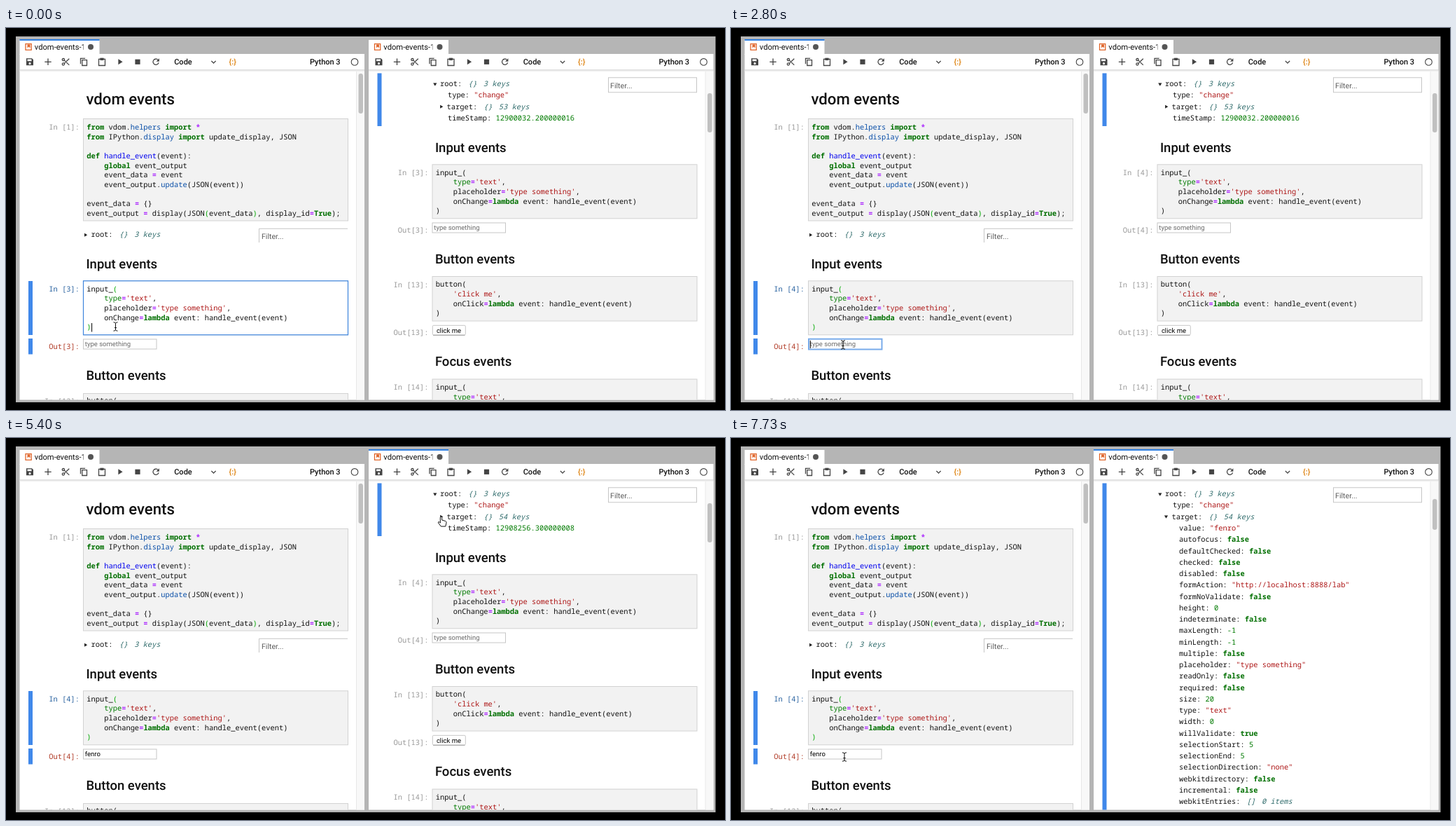
Animation of 1027x545 px, one loop 8000 ms. Source, as an HTML page:

```html
<!DOCTYPE html>
<html lang="en">
<head>
<meta charset="utf-8">
<title>vdom events</title>
<style>
  html, body { margin: 0; width: 100%; height: 100%; overflow: hidden; background: #000; }
  svg { display: block; width: 100%; height: 100%; }
  text { white-space: pre; fill: #111; text-rendering: geometricPrecision; }
  .mono { font: 500 10.42px "Noto Sans Mono", "DejaVu Sans Mono", monospace; }
  .h1 { font: 500 22.2px Roboto, sans-serif; }
  .h2 { font: 500 18.5px Roboto, sans-serif; }
  .ui { font: 500 11px Roboto, sans-serif; }
  .tab { font: 11.2px Roboto, sans-serif; }
  .filter { font: 10.6px Roboto, sans-serif; fill: #5c5c5c; }
  .field { font: 9.5px Roboto, sans-serif; fill: #000; }
  .hint { fill: #6c6c6c; }
  .prompt { text-anchor: end; font-weight: 400; fill: #999; }
  .in { fill: #2a63a0; }
  .out { fill: #b03a26; }
  .kw { fill: #006f00; font-weight: 700; }
  .builtin, .num { fill: #007a00; }
  .str { fill: #ad1616; }
  .op { fill: #a2f; font-weight: 700; }
  .def { fill: #00e; }
  .attr { fill: #0a4fa8; }
  .match { fill: #0a0; }
  .meta { fill: #2f6b6b; font-style: italic; }
  .icon { fill: none; stroke: #444; stroke-width: 1.3; }
  .solid { fill: #444; fill-rule: evenodd; }
  .bar { fill: #4088ea; }
  .cell { fill: #f2f2f2; stroke: #d2d2d2; }
  .box { fill: #fff; stroke: #c6c6c6; }
</style>
</head>
<body>
<svg id="stage" viewBox="0 0 1027 545"></svg>
<script>
const LOOP = 8000, TICKS = 120, LINE = 13.65, ROW = 16.25;
const NAME = 'fenro';

// Markup shown only during the given tick ranges, e.g. "0-4 9-12"
const at = (on, markup) => `<g data-on="${on}">${markup}</g>`;
const text = (x, y, cls, body, extra = '') => `<text x="${x}" y="${y}" class="${cls}" ${extra}>${body}</text>`;
const rect = (x, y, w, h, cls, extra = '') =>
  `<rect x="${x}" y="${y}" width="${w}" height="${h}" class="${cls}" ${extra}/>`;
const path = (d, cls, extra = '') => `<path d="${d}" class="${cls}" ${extra}/>`;
const span = (cls, body, extra = '') => `<tspan class="${cls}" ${extra}>${body}</tspan>`;

// Square brackets in code stand for highlighted matching parentheses
const TOKENS = new RegExp([
  "(?<str>'[^']*')", '(?<kw>\\b(?:from|import|def|global|lambda|True)\\b)', '(?<builtin>\\btype\\b)',
  '(?<def>(?<=def )\\w+)', '(?<attr>(?<=\\.)\\w+)', '(?<op>[=*])', '(?<match>[\\[\\]])'
].join('|'), 'g');
const highlight = line => line.replace(TOKENS, (token, ...rest) => {
  const kind = Object.entries(rest.at(-1)).find(([, value]) => value)[0];
  return span(kind, token.replace('[', '(').replace(']', ')'));
});
const code = (y, lines) => lines.map((line, i) => text(115.2, y + i * LINE, 'mono', highlight(line))).join('');
const prompt = (y, label, cls = '') => text(105, y, 'mono prompt ' + cls, label + ':');
const cell = (y, h) => rect(110.5, y, 378, h, 'cell');
const heading = (y, label) => text(114.4, y, 'h2', label);
const bar = (y, h, id = '') => rect(32, y, 6, h, 'bar', id);
const hint = y => text(112.8, y, 'field hint', 'type something');
const field = y => rect(110.5, y, 104.5, 14, 'box');
const inputLines = (open, close) => [
  'input_' + open, "    type='text',", "    placeholder='type something',",
  '    onChange=lambda event: handle_event(event)', close
];
const buttonLines = ['button(', "    'click me',", '    onClick=lambda event: handle_event(event)', ')'];

const twisty = (x, y, open) => path(open ? `M${x - 2.6} ${y - 1.8}h5.2l-2.6 4.2z` : `M${x - 2} ${y - 2.5}v5l4.2-2.5z`, '', 'fill="#222"');
const branch = (x, y, key, brace, count, id = '') => text(x, y, 'mono',
  key + ':' + span('meta', brace, 'dx="9"') + span('meta', count, 'dx="9" ' + id));
const kindOf = value => value[0] === '"' ? 'str' : /^[\d-]/.test(value) ? 'num' : 'kw';
const leaf = (x, y, key, value, id = '') => text(x, y, 'mono', key + ': ' + span(kindOf(value), value, id));

const ICONS = [
  [34, path('M-5-5H3L5-3V5H-5ZM-3.5-3.8V-1H2.5V-3.8ZM0 .8a1.6 1.6 0 1 0 .01 0Z', 'solid')],
  [60, path('M-4.7 0H4.7M0-4.7V4.7', 'icon')],
  [85.3, path('M-2-2.2L5 4.6M-2 2.2L5-4.6M-5-3.2a1.6 1.6 0 1 0 3.2 0a1.6 1.6 0 1 0-3.2 0M-5 3.2a1.6 1.6 0 1 0 3.2 0a1.6 1.6 0 1 0-3.2 0', 'icon')],
  [111, path('M-4.5 3V-5H2.2M-2.2-2.7H4.5V5.2H-2.2Z', 'icon')],
  [137, path('M-4.5-4H4.5V5.2H-4.5Z', 'icon') + path('M-2.6-5.6H2.6V-2.2H-2.6Z', 'solid')],
  [163, path('M-2.6-4L3.6 0L-2.6 4Z', 'solid')],
  [188, path('M-3.6-3.6H3.6V3.6H-3.6Z', 'solid')],
  [214, path('M3-2.9A4.1 4.1 0 1 0 4.1 1', 'icon') + path('M4.9-5V-.6H.5Z', 'solid')]
];

const panel = (shift, active, mode, hover, content) => `<g transform="translate(${shift})">
  ${rect(19.5, 17, 114, 21, '', 'fill="#fff"')}
  ${at(active, rect(19.5, 16, 114, 2, '', 'fill="#2c7de0"'))}
  ${path('M28 22.7H36.2V31.3H28Z', '', 'fill="none" stroke="#e0662b" stroke-width="1.3"')}
  ${path('M30.5 23.5H34.5V28.5L32.5 26.8L30.5 28.5Z', '', 'fill="#e0662b"')}
  <g clip-path="url(#label)">${text(40.8, 31, 'tab', 'vdom-events-1')}</g>
  <circle cx="121" cy="27" r="4" fill="#555"/>
  ${rect(19.5, 37, 492.5, 493.5, '', 'fill="#fff"')}
  ${hover}
  ${ICONS.map(([x, icon]) => `<g transform="translate(${x} 48.3)">${icon}</g>`).join('')}
  ${mode}
  ${path('M293.4 47L296.5 50.1L299.6 47', 'icon')}
  ${text(323.7, 52, 'ui', '{:}', 'style="fill:#e08a1e;font-weight:700" text-anchor="middle"')}
  ${text(434, 52.4, 'ui', 'Python 3')}
  <circle cx="498" cy="48.4" r="4.8" class="icon" style="stroke-width:1.1"/>
  ${at('2-7 48-49 53-54', '<circle cx="498" cy="48.4" r="4.8" class="solid"/>')}
  ${rect(19.5, 59.5, 492.5, 1, '', 'fill="#c4c4c4"')}${rect(19.5, 60.5, 492.5, 1.5, '', 'fill="#eee"')}
  <g clip-path="url(#page)">${rect(501, 62, 12, 470, '', 'fill="#f8f8f8"')}${path('M500.5 62V531', '', 'stroke="#e8e8e8"')}${content}</g>
</g>`;
const thumb = (y, h) => rect(503.5, y, 6.5, h, '', 'rx="3.2" fill="#c0c0c0"');
const codeMode = text(240.2, 52.4, 'ui', 'Code');

const left = [
  thumb(65, 57),
  text(114.4, 108.6, 'h1', 'vdom events'),
  prompt(145.3, 'In [1]'), cell(129.5, 145.5),
  code(145, [
    'from vdom.helpers import *', 'from IPython.display import update_display, JSON', '',
    'def handle_event(event):', '    global event_output', '    event_data = event',
    '    event_output.update(JSON(event))', '', 'event_data = {}',
    'event_output = display(JSON[event_data], display_id=True);'
  ]),
  twisty(114, 295.3, false), branch(121.4, 298.3, 'root', '{}', '3 keys'),
  path('M361.5 306V286.3H488', 'box'), text(365, 300.6, 'filter', 'Filter...'),
  heading(342.8, 'Input events'),
  at('0-1 27-120', bar(361, 77)),
  at('0-1 27-120', bar(443, 22.5)),
  at('0-1', prompt(376, 'In [3]', 'in')), at('1-4', prompt(376, 'In [*]')),
  at('4-27', prompt(376, 'In [4]')), at('27-120', prompt(376, 'In [4]', 'in')),
  cell(360.8, 77),
  at('0-1', rect(110.5, 360.8, 378, 77, '', 'fill="#fff" stroke="#3c84dc" stroke-width="1.2"') +
    path('M122.6 421V433.5', '', 'stroke="#000"')),
  code(375.7, inputLines('[', ']')),
  at('0-1', prompt(457.6, 'Out[3]', 'out')), at('1-2', prompt(457.6, 'Out[3]')),
  at('3-27', prompt(457.6, 'Out[4]')), at('27-120', prompt(457.6, 'Out[4]', 'out')),
  at('0-2 3-120', field(444)),
  at('27-81', rect(111, 443.7, 104.5, 14.8, '', 'fill="#fff" stroke="#79abea" stroke-width="2"')),
  at('0-2 3-43', hint(454.2)),
  text(112.8, 454.2, 'field', '', 'id="typed"'),
  at('27-35 42-60 68-76', path('M0 445.8V457', '', 'id="caret" stroke="#000"')),
  `<g class="below">${at('1-27', bar(474, 39))}${heading(502, 'Button events')}${prompt(535.6, 'In [13]')}
    ${cell(521.5, 64)}${code(535.3, buttonLines)}</g>`
].join('');

const fields = `value "${NAME}"|autofocus false|defaultChecked false|checked false|disabled false|
formAction "http://localhost:8888/lab"|formNoValidate false|height 0|indeterminate false|maxLength -1|
minLength -1|multiple false|placeholder "type something"|readOnly false|required false|size 20|type "text"|
width 0|willValidate true|selectionStart 5|selectionEnd 5|selectionDirection "none"|webkitdirectory false|
incremental false`.split('|').map(item => item.trim().match(/(\S+) (.*)/).slice(1));

const belowTree = [
  bar(64.5, 75.5), thumb(93, 56), twisty(123.6, 112.3, false),
  leaf(132.4, 132, 'timeStamp', '12900032.200000016', 'id="stamp"'),
  heading(176.8, 'Input events'),
  at('0-1', prompt(210, 'In [3]')), at('1-4', prompt(210, 'In [*]')), at('4-120', prompt(210, 'In [4]')),
  cell(194.8, 77), code(209.7, inputLines('(', ')')),
  at('0-2', prompt(291.6, 'Out[3]')), at('3-120', prompt(291.6, 'Out[4]')),
  at('0-2 3-120', field(278) + hint(288.4)),
  `<g class="below">${heading(336, 'Button events')}${prompt(369.6, 'In [13]')}${cell(354.5, 63.5)}
    ${code(369.4, buttonLines)}${prompt(437.6, 'Out[13]')}
    ${rect(110.8, 424.3, 47, 13.6, 'box', 'rx="1.5"')}${path('M111.5 438.4H157', '', 'stroke="#a8a8a8"')}
    ${text(116.4, 434.6, 'field', 'click me')}
    ${heading(482, 'Focus events')}${prompt(516.4, 'In [14]')}${cell(501, 78)}
    ${code(516.2, inputLines('(', ')'))}</g>`
].join('');

const openTree = [
  bar(64.5, 468, 'id="hoverBar"'), at('84-85', thumb(93, 56)), at('85-120', thumb(87, 44)),
  twisty(123, 112.3, true),
  ...fields.map(([key, value], i) => leaf(141.6, 132 + i * ROW, key, value)),
  branch(141.6, 132 + fields.length * ROW, 'webkitEntries', '[]', '0 items')
].join('');

const right = [
  twisty(114.3, 80.3, true), branch(121.6, 83.3, 'root', '{}', '3 keys'),
  rect(362, 70.8, 126, 21, 'box'), text(364.6, 85.6, 'filter', 'Filter...'),
  leaf(132.4, 99.4, 'type', '"change"'),
  branch(131, 115.5, 'target', '{}', '53 keys', 'id="keys"'),
  at('0-84', belowTree), at('84-120', openTree)
].join('');

const stage = document.getElementById('stage');
stage.innerHTML = `<defs>
    <clipPath id="page"><rect x="19.5" y="61" width="492.5" height="469.5"/></clipPath>
    <clipPath id="label"><rect x="38" y="18" width="72.8" height="18"/></clipPath>
  </defs>
  <rect width="1027" height="545"/>
  ${rect(14, 12, 999.5, 522, '', 'fill="#b5b5b5"')}
  ${panel(0, '0-81', at('0-1 27-120', codeMode) + at('1-27', text(240.2, 52.4, 'ui', 'Markdown')), '', left)}
  ${panel(498.5, '81-120', codeMode, at('67-69', rect(47.5, 39, 25, 20, 'box')), right)}
  <g id="mouse">
    <g id="beam">${path('M-3-6.2Q0-6.2 0-4.4Q0-6.2 3-6.2M0-4.6V4.6M-3 6.2Q0 6.2 0 4.4Q0 6.2 3 6.2M-1.6 1.6H1.6', '', 'fill="none" stroke="#111"')}</g>
    <g id="arrow">${path('M0 0V11.2L2.6 8.8L4.4 13L6.3 12.2L4.5 8.2H8Z', '', 'fill="#111" stroke="#fff" stroke-width=".8"')}</g>
    <g id="hand">${path('M-1.2 .8Q0-.8 1.2 .8V4.6L6.2 6Q7.8 6.6 7.5 8.6L6.3 13.6H-.2L-4 8.6Q-4.4 6.8-3 7L-1.2 8.6Z', '', 'fill="#fff" stroke="#111"')}</g>
  </g>`;

// tick, x, y, pointer
const MOUSE = [
  [0, 156.5, 426, 'beam'], [1, 156.5, 426, ''], [17, 157, 428, 'beam'], [26, 160, 452, 'beam'], [43, 160, 452, ''],
  [60, 160, 452, 'beam'], [62, 182, 420, 'arrow'], [64, 300, 262, 'arrow'], [66, 480, 92, 'arrow'],
  [67, 552, 46, 'arrow'], [68, 582, 43, 'arrow'], [69, 600, 56, 'arrow'], [71, 624, 95, 'arrow'],
  [73, 626, 102, 'arrow'], [77, 621, 112, 'hand'], [78, 621.5, 112.5, 'hand'], [88, 621.5, 112.5, 'hand'],
  [89, 630, 116, 'arrow'], [92, 692, 129, 'arrow'], [94, 691, 128, 'arrow'], [97, 694.5, 128.5, 'arrow'],
  [99, 694.5, 128.5, 'arrow'], [102, 660, 150, 'arrow'], [105, 533, 232, 'arrow'], [109, 230, 420, 'arrow'],
  [112, 159.5, 459.5, 'arrow'], [113, 159.5, 459.5, 'arrow'], [115, 162, 455, 'beam'], [TICKS, 162, 455, 'beam']
];
const STAMPS = [
  [0, '12900032.200000016'], [44, '12907612.900000012'], [48, '12907874.100000009'],
  [50, '12908003.700000004'], [53, '12908139.500000012'], [54, '12908256.300000008']
];
const TYPING = [0, 43, 47, 49, 51, 53];

const $ = id => document.getElementById(id);
const timed = [...stage.querySelectorAll('[data-on]')].map(el => ({
  el, ranges: el.dataset.on.split(' ').map(range => range.split('-').map(Number))
}));
const below = stage.querySelectorAll('.below');

function placeMouse(tick) {
  const i = MOUSE.findLastIndex(key => key[0] <= tick);
  const [start, x0, y0, pointer] = MOUSE[i], [end, x1, y1] = MOUSE[i + 1];
  const k = (tick - start) / (end - start);
  const x = x0 + (x1 - x0) * k, y = y0 + (y1 - y0) * k;
  $('mouse').setAttribute('transform', `translate(${x} ${y})`);
  for (const id of ['beam', 'arrow', 'hand']) $(id).style.display = id === pointer ? '' : 'none';
  $('hoverBar').style.fill = tick > 99 && Math.abs(x - 533) < 8 ? '#2f70cf' : '';
}

function render(time) {
  const tick = Math.floor((time + 4) * 0.015) % TICKS;
  for (const { el, ranges } of timed)
    el.style.display = ranges.some(([from, to]) => tick >= from && tick < to) ? '' : 'none';
  // The cleared output lets the cells below move up for a moment
  below.forEach(el => el.setAttribute('transform', `translate(0 ${tick === 2 ? -27 : 0})`));
  $('typed').textContent = NAME.slice(0, TYPING.findLastIndex(start => start <= tick));
  $('caret').setAttribute('transform', `translate(${113.3 + $('typed').getComputedTextLength()})`);
  $('keys').textContent = tick < 44 ? '53 keys' : '54 keys';
  $('stamp').textContent = STAMPS.findLast(([start]) => start <= tick)[1];
  placeMouse(tick);
}

let begin;
function frame(now) {
  begin ??= now;
  render((now - begin) % LOOP);
  requestAnimationFrame(frame);
}
render(0);
requestAnimationFrame(frame);
</script>
</body>
</html>
```
